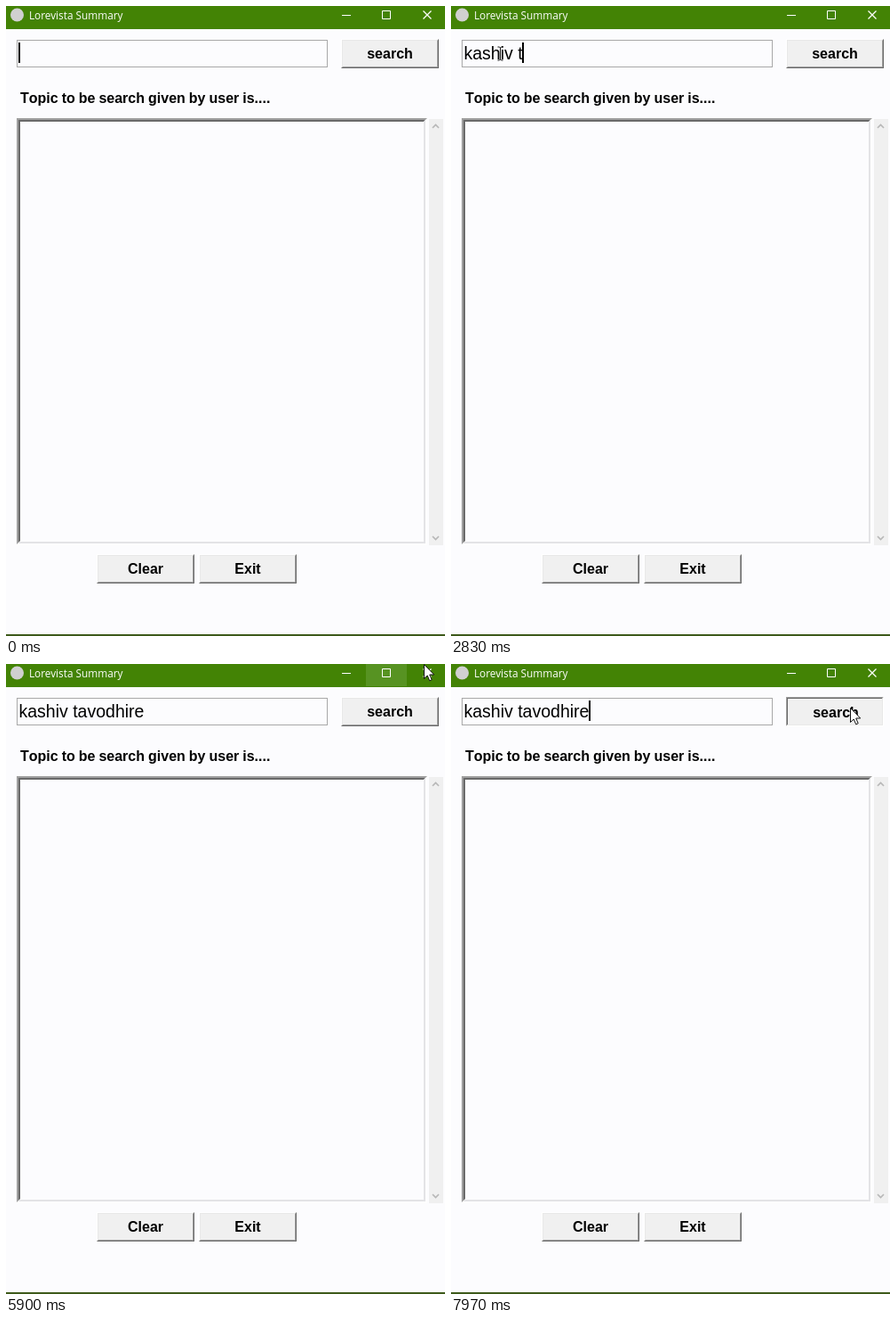
An HTML page that plays this animation: 494x708 px, repeating every 8000 ms.

```html
<!DOCTYPE html>
<html lang="en">
<head>
<meta charset="utf-8">
<title>Lorevista Summary</title>
<style>
html, body { margin: 0; height: 100%; overflow: hidden; background: #fcfcfe; }
svg { display: block; width: 494px; height: 708px; font-family: "Liberation Sans", Arial, sans-serif; }
.bold { font-weight: bold; font-size: 16px; font-kerning: none; word-spacing: -.45px; }
.line { fill: none; stroke: #fff; }
#query { font-size: 19.5px; white-space: pre; }
</style>
</head>
<body>
<svg id="stage" viewBox="0 0 494 708">
  <rect width="494" height="26" fill="#438305"/>
  <rect id="hover" x="405" width="46" height="25" fill="#579322"/>
  <circle cx="12.5" cy="10" r="7.5" fill="#d0d0d0"/>
  <text x="26" y="15" font-size="11.8" fill="#fff" style="font-family:'Open Sans','Noto Sans',sans-serif">Lorevista Summary</text>
  <path class="line" d="M378 10.5h10M423.5 5.5h9v9h-9z"/>
  <path class="line" stroke-width="1.3" d="M469.5 5.5l9 9m0-9l-9 9"/>

  <rect x="12.5" y="38.5" width="349" height="30" fill="#fcfcfe" stroke="#a8a8a8"/>
  <text id="query" x="14.5" y="60"></text>
  <rect id="caret" y="41" width="2" height="23"/>
  <text class="bold" x="16" y="109">Topic to be search given by user is....</text>

  <rect x="12" y="126" width="462" height="480" fill="#fefefe"/>
  <path d="M12 605V126H474L472 128H14V603z" fill="#a0a0a0"/>
  <path d="M14 603V128H472L470 130H16V601z" fill="#696969"/>
  <path d="M472 128V604H14L16 602H470V130z" fill="#e3e3e6"/>
  <rect x="16" y="130" width="454" height="472" fill="#fcfcfe"/>
  <rect x="476" y="127" width="16" height="479" fill="#f0f0f0"/>
  <path d="M480 137l3.5-3.5 3.5 3.5M480 596l3.5 3.5 3.5-3.5" fill="none" stroke="#b8b8b8" stroke-width="1.7"/>

  <g id="buttons"></g>
  <rect y="706" width="494" height="2" fill="#3d5a1a"/>

  <path id="beam" d="M-3 -7.5H-1L0 -6.5 1 -7.5H3M0 -6.5V6.5M-3 7.5H-1L0 6.5 1 7.5H3" fill="none" stroke="#111"/>
  <path id="arrow" d="M.5 .5V16.5L4.2 13 6.7 18.8 9.2 17.7 6.7 12H11.7z" fill="#fff" stroke="#111"/>
</svg>
<script>
const LOOP = 8000;
const $ = id => document.getElementById(id);
const name = "kashiv tavodhire";
// time of each key press
const keys = [870, 1000, 1130, 1670, 1870, 2070, 2500, 2830, 3000, 3750, 4200, 4510, 4520, 4530, 4770, 4970];
const caretOn = [[0, 170], [470, 1070], [1430, 2030], [2330, 2970], [3270, 3870], [4170, 4770], [5080, 5650], [5950, LOOP]];
// time, x, y of the pointer
const path = [[0, 55, 53], [5630, 55, 53], [5760, 250, 30], [5900, 470, 0], [6000, 482, 11], [6150, 454, 43], [6250, 449, 49], [LOOP, 449, 49]];
const PRESS = 6300;

// outer and inner colours of the lit and the shaded edges
const lit = ["#fff", "#e8e8e8"];
const raised = [...lit, "#696969", "#a0a0a0"];
const sunken = ["#a0a0a0", "#696969", ...lit];

function button(x, y, label) {
  const box = document.createElementNS("http://www.w3.org/2000/svg", "g");
  box.setAttribute("transform", `translate(${x} ${y})`);
  $("buttons").append(box);
  return pressed => {
    const [top, topIn, low, lowIn] = pressed ? sunken : raised;
    const shift = pressed ? 1 : 0;
    box.innerHTML = `<rect width="110" height="33" fill="#f0f0f0"/>
      <path fill="${top}" d="M0 33V0H110L109 1H1V32z"/>
      <path fill="${topIn}" d="M1 32V1H109L108 2H2V31z"/>
      <path fill="${low}" d="M110 0V33H0L1 32H109V1z"/>
      <path fill="${lowIn}" d="M109 1V32H1L2 31H108V2z"/>
      <text class="bold" text-anchor="middle" x="${55 + shift}" y="${22 + shift}">${label}</text>`;
  };
}

const search = button(377, 37, "search");
button(102, 616, "Clear")(false);
button(217, 616, "Exit")(false);

function pointer(t) {
  const i = path.findIndex(p => p[0] > t);
  const [a, b] = [path[i - 1], path[i]];
  const k = (t - a[0]) / (b[0] - a[0]);
  return [a[1] + (b[1] - a[1]) * k, a[2] + (b[2] - a[2]) * k];
}

const show = (id, on) => $(id).setAttribute("visibility", on ? "visible" : "hidden");

function draw(t) {
  $("query").textContent = name.slice(0, keys.filter(k => k <= t).length);
  $("caret").setAttribute("x", Math.round(14 + $("query").getComputedTextLength()));
  show("caret", caretOn.some(([from, to]) => t >= from && t < to));
  show("hover", t >= 5860 && t < 5950);
  search(t >= PRESS);

  const [x, y] = pointer(t).map(Math.round);
  const inEntry = x < 362 && y > 37;
  $("beam").setAttribute("transform", `translate(${x + .5} ${y + .5})`);
  $("arrow").setAttribute("transform", `translate(${x} ${y})`);
  show("beam", inEntry && t >= 150);
  show("arrow", !inEntry);
}

const start = performance.now();
function tick() {
  draw((performance.now() - start) % LOOP);
  requestAnimationFrame(tick);
}
tick();
</script>
</body>
</html>
```
